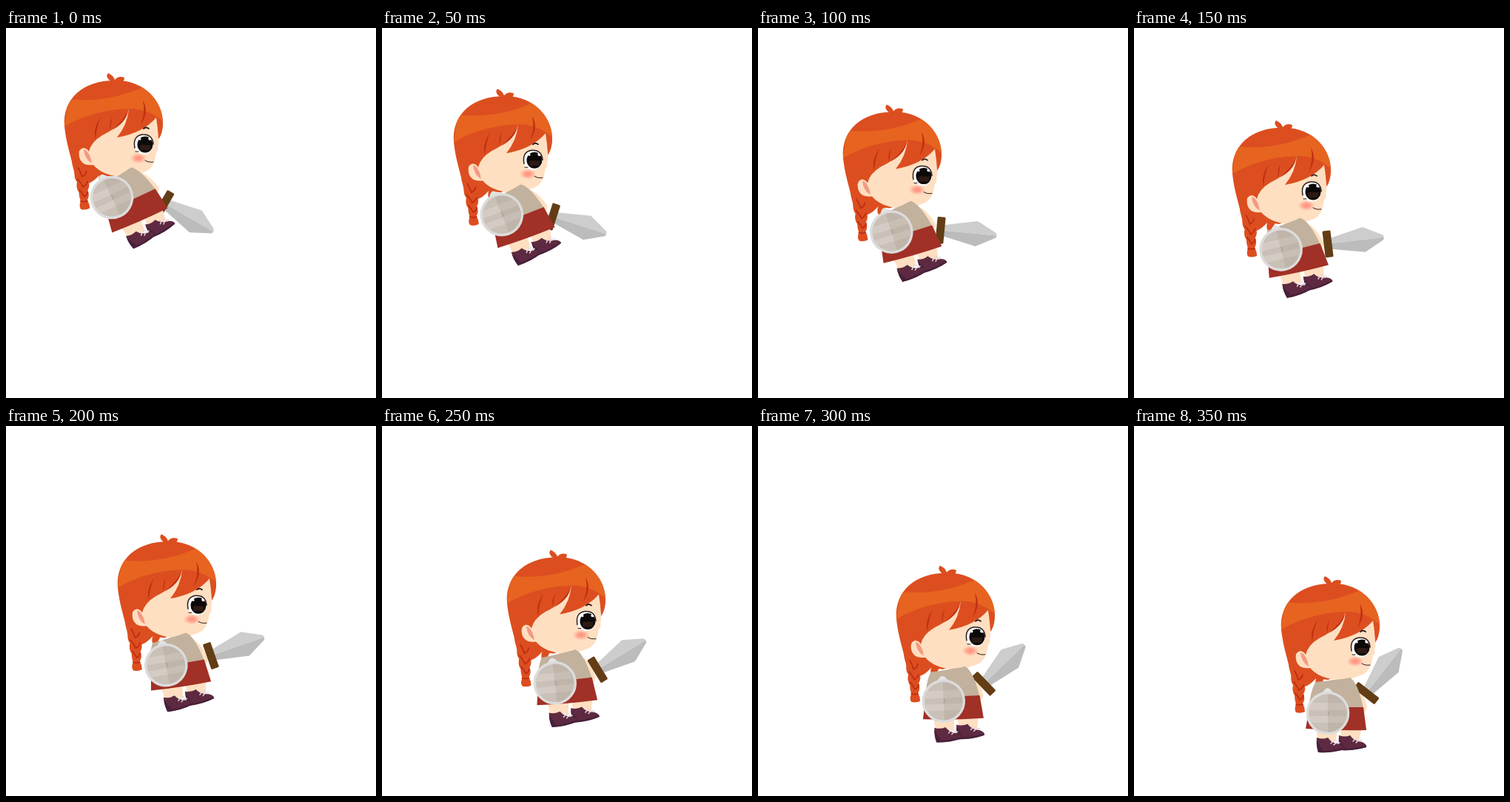
An HTML page that plays this animation: 500x500 px, repeating every 500 ms.

```html
<!DOCTYPE html>
<html lang="en">
<head>
<meta charset="utf-8">
<title>Little warrior</title>
<style>
  /* --p runs from 1 (raised, leaning) to 0 (standing) in 50 ms steps */
  @property --p { syntax: "<number>"; inherits: true; initial-value: 1; }
  html, body { margin: 0; width: 100%; height: 100%; overflow: hidden; background: #fff; }
  svg { display: block; width: 100%; height: 100%; animation: land 500ms infinite; }
  @keyframes land {
    0% { --p: 1; animation-timing-function: steps(7, end); }
    70%, 100% { --p: -.05; }
  }
  #girl {
    --q: max(0, var(--p));
    transform: translate(calc(var(--q) * -120px), calc(var(--q) * -142px));
  }
  .body { transform-origin: 269px 343px; transform: rotate(calc(var(--q) * -25deg)); }
  .braid { transform-origin: 218px 322px; transform: rotate(calc(var(--q) * -2deg)); }
  .sword {
    transform:
      translate(calc(314px + 32px * var(--q) - 12px * var(--q) * var(--q)),
                calc(361px + 14px * var(--q) + 4px * var(--q) * var(--q)))
      rotate(calc(82deg * var(--q) - 52deg));
  }
  .shield {
    transform:
      translate(calc(262px + 9px * var(--q) - 8px * var(--q) * var(--q)),
                calc(388px - 22px * var(--q) + 5px * var(--q) * var(--q)))
      rotate(calc(var(--q) * -25deg));
  }
  .hair { fill: #dc4e1f; }
  .shine { fill: #e76320; }
  .strand { fill: none; stroke: #bd2b12; stroke-width: 1.7; stroke-linecap: round; }
  .skin { fill: #ffdfc1; }
  .shoe { fill: #5e2a41; }
  .sole { fill: #47203a; }
  .lace { fill: none; stroke: #e9d5dc; stroke-width: 1.5; stroke-linecap: round; }
  .ink { fill: none; stroke: #2b1b18; stroke-linecap: round; }
</style>
</head>
<body>
<svg viewBox="0 0 500 500">
  <defs>
    <radialGradient id="blush">
      <stop offset="0" stop-color="#ff8f7c"/>
      <stop offset=".45" stop-color="#ff9d88" stop-opacity=".85"/>
      <stop offset="1" stop-color="#ffb9a0" stop-opacity="0"/>
    </radialGradient>
    <clipPath id="dome">
      <path id="domeShape" d="M199 275C196 235 228 212 268 213C308 212 334 243 332 274Q331 285 327 291L300 330L262 343L246 341Q238 350 231 352L213 345C212 325 202 305 199 275Z"/>
    </clipPath>
    <clipPath id="disc"><circle r="26"/></clipPath>
    <g id="shoe">
      <path class="shoe" d="M0 0Q8 3 15 0Q20 8 31 9Q38 12 37 16Q20 21 2 20Q-1 9 0 0Z"/>
      <path class="sole" d="M0 3Q4 11 9 19L2 20Q-1 11 0 3ZM2 18Q22 18 37 14L37 16Q22 21 2 20Z"/>
      <path class="lace" d="M19 8Q22 4 27 4M23 10Q26 6 31 7"/>
    </g>
  </defs>

  <g id="girl">
    <g class="body">
      <path class="skin" d="M302 352Q311 362 315 380Q313 388 307 386L300 378Z"/>
    </g>

    <g class="sword">
      <path d="M4 -7.5L49 -17L74 -4Q77 -2 76 0L4 0Z" fill="#cdcdcd"/>
      <path d="M4 7.5L49 17L74 4Q77 2 76 0L4 0Z" fill="#bcbcbc"/>
      <rect x="-5.5" y="-18" width="11" height="36" rx="1.5" fill="#633d15"/>
    </g>

    <g class="head">
      <path class="hair" d="M246 341Q244 349 248 353Q255 348 257 340Z"/>
      <use href="#domeShape" class="hair"/>
      <path class="hair" d="M263 215Q253 208 258 203Q265 206 267 212Q272 206 280 209Q280 215 274 216Z"/>
      <path class="shine" clip-path="url(#dome)" d="M205 238Q258 244 310 220L340 245L334 270Q312 250 286 251Q235 253 198 276Z"/>

      <g class="braid">
        <path class="hair" d="M209 312Q208 328 213 337Q211 345 215 350Q213 358 217 364Q217 370 219 376Q216 383 219 387Q225 389 231 386Q231 380 228 375Q232 369 229 362Q233 355 230 349Q234 340 229 333L232 318Z"/>
        <path class="strand" d="M217 331Q221 338 222 343Q227 341 228 336M216 346Q221 352 223 357Q228 354 229 350M218 361Q222 366 224 370Q228 368 229 364"/>
        <path class="strand" stroke-width="3" d="M219 376Q224 378 228 376"/>
      </g>

      <path class="skin" d="M286 251Q284 273 270 290Q305 284 323 263Q325 276 326 290Q327 297 325 303Q327 307 323 310Q322 316 321 320Q317 335 303 338Q290 344 275 343Q250 341 238 327Q222 329 219 316Q217 305 225 304Q230 305 232 309Q235 296 250 287Q281 272 286 251Z"/>
      <path d="M225 306Q235 309 236 325Q226 319 225 306Z" fill="#f39a82"/>
      <path d="M229 308Q237 312 238 325L236 325Q235 315 229 308Z" class="skin"/>

      <path d="M305 240Q314 255 302 273Q309 256 305 240ZM248 262Q237 279 241 292Q242 276 248 262ZM264 262Q259 271 261 280Q262 270 264 262ZM285 254Q282 270 263 280Q279 267 285 254Z" fill="#bf2e13"/>

      <ellipse cx="299" cy="318" rx="12" ry="7.5" fill="url(#blush)"/>
      <ellipse cx="306" cy="299" rx="13" ry="13.5" fill="#fff"/>
      <ellipse cx="308" cy="299.500" rx="10.500" ry="11" fill="#0c0909"/>
      <path d="M301 300H315.500L314.500 307H301.500Z" fill="#2c1a13"/>
      <circle cx="314.500" cy="291.500" r="2.200" fill="#fff"/>
      <circle cx="301" cy="292" r="1.500" fill="#fff"/>
      <path class="ink" stroke-width="1.500" d="M294 304Q291 288 304 286Q318 285 319 299"/>
      <path class="ink" stroke-width="1" d="M295 309L299 309"/>
      <path class="ink" stroke-width="1.800" d="M306 278Q309 275 313 278"/>
      <path class="ink" stroke-width="1" stroke="#7c3a2c" d="M308 321Q312 324 319 323"/>
    </g>

    <g class="body">
      <path class="skin" d="M246 406H275L273 425H249ZM279 406H308L304 425H280Z"/>
      <use href="#shoe" x="277" y="418"/>
      <use href="#shoe" x="247" y="421"/>
      <path d="M245 346Q257 345 270 343Q283 342 292 340Q303 347 310 382H236Q238 360 245 346Z" fill="#c2b19c"/>
      <path d="M237 380H310L314 411Q273 412 232 409Z" fill="#a13026"/>
    </g>

    <g class="shield">
      <path d="M-8 -26Q-4 -34 0 -34Q4 -33 8 -26Z" fill="#e4e4e4"/>
      <circle r="27.500" fill="#c9c0b7" stroke="#dcdcdc" stroke-width="3.500"/>
      <g clip-path="url(#disc)">
        <path d="M-28 -14H28V-4H-28ZM-28 4H28V13H-28Z" fill="#d4ccc4"/>
        <path d="M0 -28H28V28H0Z" fill="#a99c90" opacity=".3"/>
      </g>
      <path d="M0 -3Q3 0 0 3" fill="none" stroke="#a79b90"/>
    </g>
  </g>
</svg>
</body>
</html>
```
